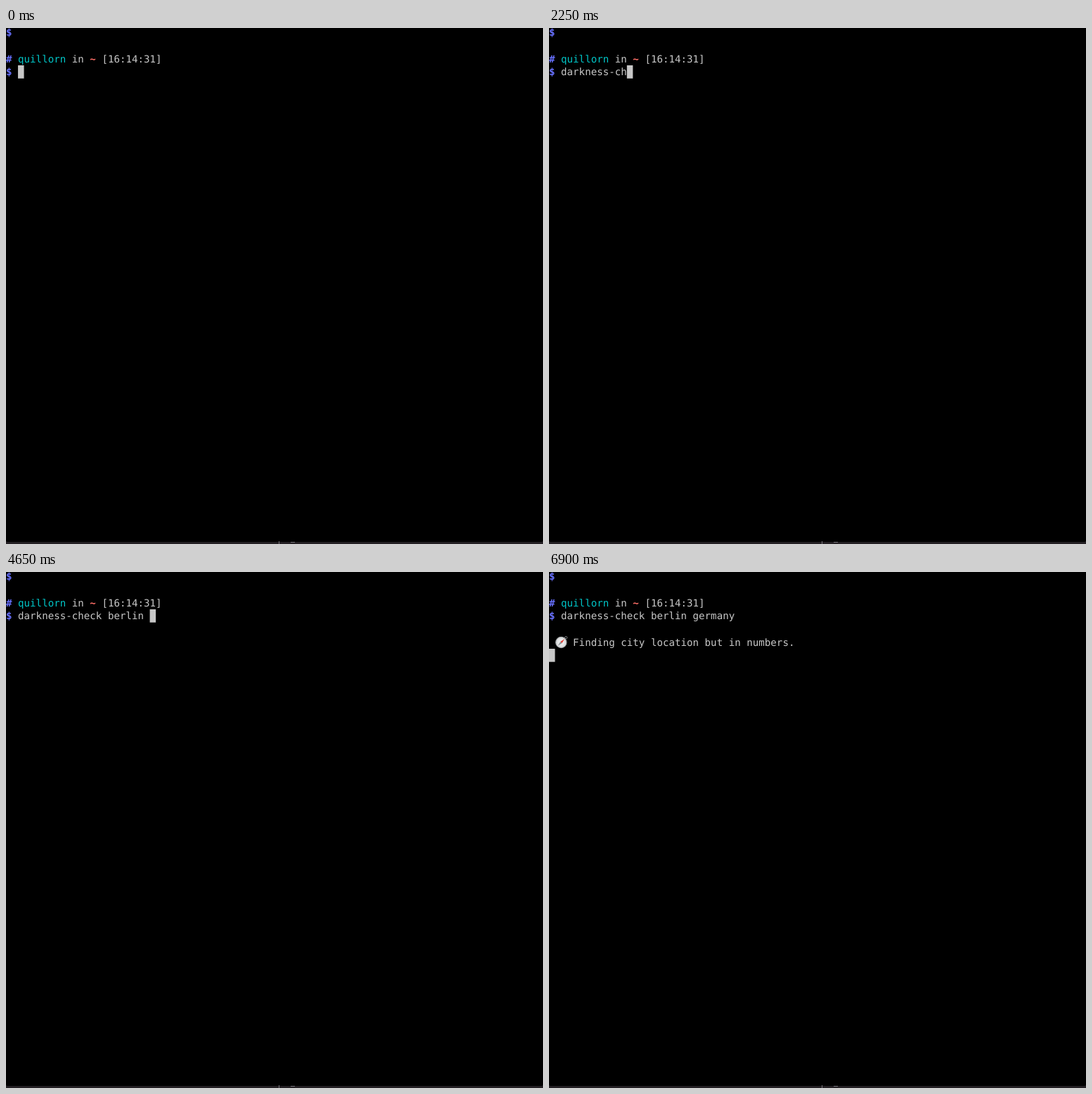
An HTML page that plays this animation: 764x733 px, repeating every 8 s.

```html
<!DOCTYPE html>
<html lang="en">
<head>
<meta charset="utf-8">
<title>Terminal</title>
<style>
  html, body { margin: 0; width: 100%; height: 100%; overflow: hidden; background: #000; }
  svg { display: block; width: 764px; height: 733px; }
  text {
    font: 14.16px "DejaVu Sans Mono", monospace;
    fill: #c7c7c7;
    white-space: pre;
    text-rendering: geometricPrecision;
  }
  .blue { fill: #6871ff; font-weight: bold; }
  .cyan { fill: #00c5c7; }
  .red { fill: #ff6e67; font-weight: bold; }
</style>
</head>
<body>
<svg id="stage" viewBox="0 0 764 733">
  <rect width="764" height="733"/>
  <path d="M0 728q0 2 3 2H761q3 0 3-2V733H0z" fill="#231f23"/>
  <path d="M388.5 729v4M405 730.5h6" stroke="#77747a"/>
  <rect id="cursor" fill="#c7c7c7"/>
  <g id="output">
    <circle cx="24.2" cy="93.2" r="1.7" fill="none" stroke="#8e9092" stroke-width=".9"/>
    <circle cx="17.3" cy="100" r="7.6" fill="#e9eaea" stroke="#a5a8aa" stroke-width="1.3"/>
    <circle cx="17.3" cy="100" r="5.6" fill="none" stroke="#c9cccd" stroke-width=".6"/>
    <path d="M22 95.2L18.5 101.1 16.2 98.9z" fill="#e33b32"/>
    <path d="M12.7 104.8L18.5 101.1 16.2 98.9z" fill="#8d9296"/>
  </g>
</svg>
<script>
const LOOP = 8000, ENTER = 6900, TICK = 150;
const CELL = 8.525, ROW = 18.67, TOP = -3;

// One slot per tick: dots are pauses, letters sharing a slot land together.
const RHYTHM = "...|d|a|.|r|k|.|n|e|ss|.|-|c|h|e|c|k| |...|b|er|.|l|.|in|..| |g|e|r|m|a|....|n|.|y";
const slots = RHYTHM.replace(/\.+/g, dots => Array(dots.length).fill(".").join("|")).split("|");
const typedAt = time => slots.slice(0, Math.floor(time / TICK) + 1).join("").replaceAll(".", "");

const stage = document.getElementById("stage");
const cursor = document.getElementById("cursor");
const output = document.getElementById("output");

function setAttributes(el, values) {
  for (const name in values) el.setAttribute(name, values[name]);
  return el;
}

function write(col, row, content, style = "", parent = stage) {
  const el = document.createElementNS(stage.namespaceURI, "text");
  const y = Math.round(TOP + row * ROW + 14.3);
  setAttributes(el, { x: col * CELL, y, class: style });
  el.textContent = content;
  return parent.appendChild(el);
}

function moveCursor(col, row) {
  setAttributes(cursor, { x: col * CELL, y: TOP + row * ROW });
}

setAttributes(cursor, { width: CELL, height: ROW });
write(0, 0, "$", "blue");
write(0, 2, "#", "blue");
write(2, 2, "quillorn", "cyan");
write(11, 2, "in");
write(14, 2, "~", "red");
write(16, 2, "[16:14:31]");
write(0, 3, "$", "blue");
const command = write(2, 3, "");
write(4, 5, "Finding city location but in numbers.", "", output);

function draw() {
  const time = performance.now() % LOOP;
  const typed = typedAt(time);
  const entered = time >= ENTER;
  command.textContent = typed;
  output.setAttribute("visibility", entered ? "visible" : "hidden");
  if (entered) moveCursor(0, 6);
  else moveCursor(2 + typed.length, 3);
  requestAnimationFrame(draw);
}
draw();
</script>
</body>
</html>
```
